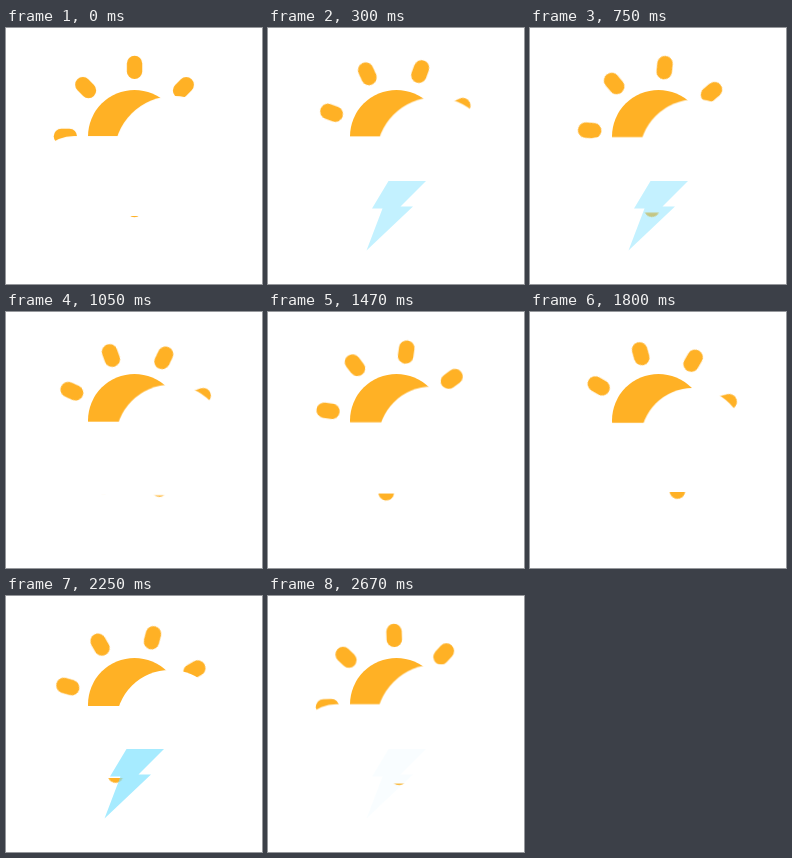
These frames come from a looping animation (256 by 256 pixels, 2700 ms). An HTML page:

```html
<!DOCTYPE html>
<html lang="en">
<head>
<meta charset="utf-8">
<title>Stormy weather</title>
<style>
  html, body { margin: 0; width: 100%; height: 100%; overflow: hidden; background: #fff; }
  svg { display: block; width: 100%; height: 100%; }
  .rays, .cloud, .bolt { animation: 2700ms linear infinite; }
  .sun { fill: #ffb125; }
  .rays { transform-origin: 128.5px 108.5px; animation-name: turn; }
  .cloud { fill: #fff; transform-origin: 128px 128px; animation-name: shrink; }
  .bolt { fill: #79e1ff; opacity: 0; animation-name: flash; }
  @keyframes turn { to { transform: rotate(180deg); } }
  @keyframes shrink {
    0%, 100% { transform: scale(1); }
    75% { transform: scale(.85); }
  }
  @keyframes flash {
    0%, 30%, 70%, 100% { opacity: 0; }
    25%, 75% { opacity: 1; }
  }
</style>
</head>
<body>
<svg viewBox="0 0 256 256">
  <defs>
    <rect id="ray" x="120.8" y="27.7" width="15.4" height="23.4" rx="7.7"/>
    <g id="pair">
      <use href="#ray"/>
      <use href="#ray" transform="rotate(45 128.5 108.5)"/>
    </g>
  </defs>
  <g class="sun">
    <circle cx="128.5" cy="108.5" r="46.5"/>
    <g class="rays">
      <use href="#pair"/>
      <use href="#pair" transform="rotate(90 128.5 108.5)"/>
      <use href="#pair" transform="rotate(180 128.5 108.5)"/>
      <use href="#pair" transform="rotate(270 128.5 108.5)"/>
    </g>
  </g>
  <g class="cloud">
    <rect x="28" y="108" width="180" height="80" rx="40"/>
    <circle cx="168" cy="128" r="60"/>
  </g>
  <path class="bolt" d="M120.5 153H158L132.500 178.500H145L98.500 222.500L114.500 180.500H104Z"/>
</svg>
</body>
</html>
```
